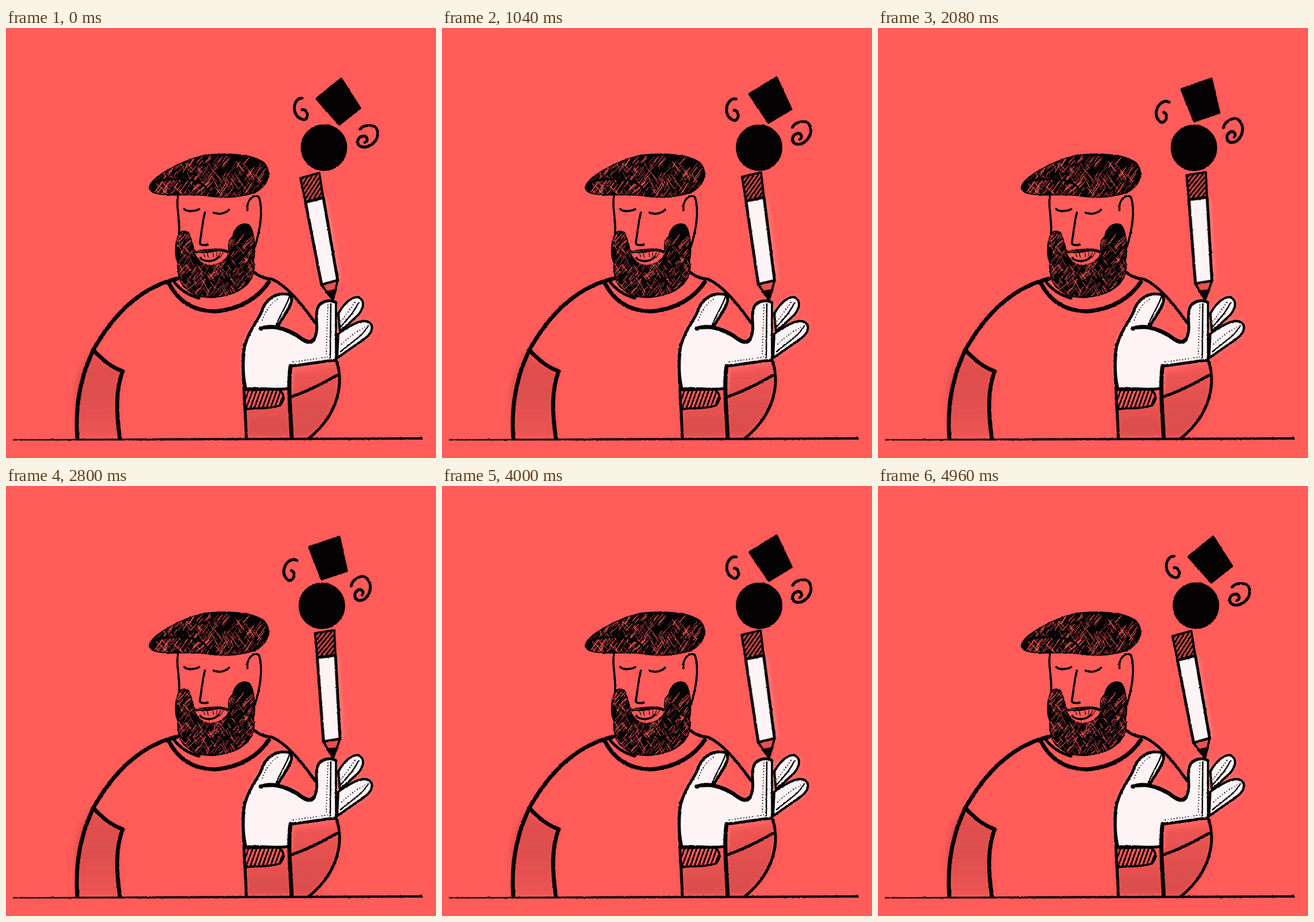
An HTML page for the animation above (5 s loop, 748x748 px).

```html
<!DOCTYPE html>
<html lang="en">
<head>
<meta charset="utf-8">
<title>Balancing act</title>
<style>
  html, body { margin: 0; width: 100%; height: 100%; overflow: hidden; background: #ff5c5a; }
  svg { display: block; width: 100vw; height: 100vh; }
  .ink { fill: none; stroke: #050203; stroke-width: 5; stroke-linecap: round; stroke-linejoin: round; }
  .thick { stroke-width: 7; }
  .thin { stroke-width: 3.6; }
  .fine { stroke-width: 2.4; }
  .solid { fill: #050203; }
  .white { fill: #fef4f6; }
  .dots { stroke-width: 2; stroke-dasharray: 0 5; }
  .scratch { fill: none; stroke: #f85a58; stroke-linecap: round; }
</style>
</head>
<body>
<svg viewBox="0 0 748 748">
  <defs>
    <filter id="rough" x="-10%" y="-10%" width="120%" height="120%" color-interpolation-filters="sRGB">
      <feTurbulence type="fractalNoise" baseFrequency=".3" numOctaves="2" seed="4"/>
      <feDisplacementMap in="SourceGraphic" scale="2.4" xChannelSelector="R" yChannelSelector="G"/>
    </filter>
    <filter id="soft" x="-30%" y="-30%" width="160%" height="160%"><feGaussianBlur stdDeviation="5"/></filter>
    <linearGradient id="sleeveShade" x2="0" y2="1">
      <stop stop-color="#b43e3e" stop-opacity=".4"/>
      <stop offset=".45" stop-color="#b43e3e" stop-opacity=".45"/>
      <stop offset="1" stop-color="#b43e3e" stop-opacity=".25"/>
    </linearGradient>
    <linearGradient id="armShade" x2="0" y2="1">
      <stop stop-color="#b43e3e" stop-opacity=".2"/>
      <stop offset=".6" stop-color="#b43e3e" stop-opacity=".45"/>
      <stop offset="1" stop-color="#b43e3e" stop-opacity=".5"/>
    </linearGradient>
    <path id="cap" d="M251 274C258 259 300 233 346 222C390 217 440 221 452 240C461 256 454 274 432 286C400 295 372 295 350 291C320 287 280 293 258 286C251 283 249 278 251 274Z"/>
    <path id="beard" d="M302 357C293 375 294 398 300 410C298 430 304 448 318 456C330 468 350 469 362 468C382 466 404 460 416 448C428 438 434 418 430 406C434 388 432 350 421 342C405 338 396 353 396 362C388 368 385 380 390 390C375 383 350 384 329 390C324 380 322 365 317 356C310 353 305 354 302 357Z"/>
    <path id="palm" d="M417 627C409 590 412 560 418 545C424 525 436 512 444 495C450 472 470 458 494 464C503 475 490 490 472 520C490 524 505 534 508 536C522 548 530 549 535 542C546 525 537 510 541 492C544 472 568 472 574 478L574 577L495 588L492 628Z"/>
    <path id="fingers" d="M578 497C586 482 600 467 613 468C626 475 622 488 612 500L581 528ZM578 532C600 516 620 505 632 512C642 522 635 532 622 542L576 574Z"/>
    <clipPath id="capClip"><use href="#cap"/></clipPath>
    <clipPath id="beardClip"><use href="#beard"/></clipPath>
    <clipPath id="bandClip"><path d="M417 630L470 629C484 631 486 645 478 655C470 662 440 661 418 663Z"/></clipPath>
    <clipPath id="eraserClip"><path d="M511 261L545 251L552 295L521 303Z"/></clipPath>
  </defs>

  <!-- soft shading -->
  <g filter="url(#soft)">
    <path fill="url(#sleeveShade)" d="M146 566L203 598C190 640 194 680 198 711H126C118 660 112 610 146 566Z"/>
    <path fill="url(#armShade)" d="M417 655L495 645V711H417Z"/>
    <path fill="url(#armShade)" d="M497 600L576 588C587 630 575 675 528 711H497Z"/>
    <g fill="#fff" opacity=".35"><use href="#palm"/><use href="#fingers"/></g>
  </g>

  <g class="ink" filter="url(#rough)">
    <path class="solid" stroke="none" d="M12 715.5L300 713.5L725 712V716L300 717.5L12 717.5Z"/>

    <!-- body -->
    <g class="thick">
      <path d="M298 436C225 453 180 510 152 560C170 580 188 592 203 597C190 630 192 670 198 713M152 560C128 610 120 660 124 713"/>
      <path d="M284 445C302 480 332 492 362 493C408 490 440 468 457 442"/>
    </g>
    <path d="M291 440C302 455 318 465 336 470M433 426C440 432 452 436 463 437C486 447 510 474 538 513"/>
    <path d="M574 577C588 615 580 670 528 713M498 641C530 630 555 616 576 604"/>

    <!-- head -->
    <g class="thin">
      <path d="M299 293C295 310 303 330 301 357M420 317C418 300 430 288 440 294C447 315 443 350 433 380"/>
      <path d="M310 315C315 320 330 319 336 315M361 321C368 325 382 323 388 316M346 321C341 340 340 360 337 374C338 378 345 378 351 377"/>
    </g>
    <use href="#beard" class="solid" stroke-width="3"/>
    <g id="beardHatch" class="scratch" clip-path="url(#beardClip)"/>
    <path fill="#f85a58" stroke="none" d="M328 390C338 385 350 391 357 388C368 384 380 387 388 391C382 404 370 412 354 412C342 411 333 402 328 390Z"/>
    <path class="fine" d="M330 391C340 388 350 392 357 389C368 386 378 387 386 391"/>
    <path class="thin" d="M338 400C346 408 362 407 370 398"/>
    <path stroke-width="1.2" d="M343 391l3 7m4 -6l2 7m8 -9l1 8m6 -8l-1 7m7 -7l-3 8m8 -7l-6 9"/>
    <use href="#cap" class="solid" stroke-width="3.6"/>
    <g id="capHatch" class="scratch" clip-path="url(#capClip)"/>
    <path class="thin" d="M258 268C290 258 335 262 346 276C353 286 358 289 366 292"/>

    <!-- glove and forearm -->
    <use href="#fingers" class="white" stroke-width="4"/>
    <use href="#palm" class="white" stroke="none"/>
    <path d="M417 627C409 590 412 560 418 545C424 525 436 512 444 495C450 472 470 458 494 464C503 475 490 490 472 520M535 542C546 525 537 510 541 492C544 472 568 472 574 478"/>
    <path class="thin" d="M574 478L574 577"/>
    <path class="thick" d="M443 523C465 515 490 525 508 536C522 547 530 549 535 542M495 588C490 620 495 670 497 713"/>
    <path d="M415 550C409 600 417 660 418 713M417 628C440 625 470 631 492 627M495 588C520 586 545 580 573 578"/>
    <path class="thin" d="M417 630L470 629C484 631 486 645 478 655C470 662 440 661 418 663"/>
    <g id="bandHatch" stroke-width="3" clip-path="url(#bandClip)"/>
    <path class="fine" d="M470 517C476 500 488 484 493 467M565 480L564 574M582 520C595 505 606 494 613 478M582 563C602 546 622 534 630 518"/>
    <path class="dots" d="M446 508C452 490 462 477 476 470M560 482L557 570M500 581C525 577 545 575 560 572M583 510C592 498 602 486 607 476M584 550C600 534 614 526 625 520"/>
  </g>

  <!-- balanced stack -->
  <g id="pencil">
    <path fill="#fff" opacity=".3" filter="url(#soft)" d="M524 303L556 295L582 439L552 447Z"/>
    <g class="ink" stroke-width="4" filter="url(#rough)">
      <path fill="#c84846" stroke="none" d="M511 261L545 251L552 295L521 303Z"/>
      <g id="eraserHatch" stroke-width="2.8" clip-path="url(#eraserClip)"/>
      <path class="white" d="M521 303L552 295L577 439L549 447Z"/>
      <path class="thin" fill="#e65250" d="M549 447L577 439L569 473Z"/>
      <path class="solid" stroke-width="2" d="M556 459L573 455L569 474Z"/>
      <path class="thin" d="M512 261L545 252L552 295L521 303Z"/>
    </g>
  </g>
  <g id="ball"><g class="ink" filter="url(#rough)"><circle class="solid" cx="553" cy="208" r="38"/></g></g>
  <g id="box"><g class="ink" filter="url(#rough)"><path class="solid" d="M541 123L583 89L615 139L580 167Z"/></g></g>
  <g id="swirlL"><g class="ink" filter="url(#rough)"><path d="M515 122C504 122 499 136 503 147C507 157 517 162 522 158C527 152 523 141 515 142"/></g></g>
  <g id="swirlR"><g class="ink" filter="url(#rough)"><path d="M616 176C620 170 631 168 640 171C649 175 648 189 642 197C635 206 623 210 615 205C608 198 613 188 623 188C630 190 630 198 624 199"/></g></g>
</svg>

<script>
const $ = id => document.getElementById(id);
let seed = 11;
const rand = (a, b) => a + (b - a) * ((seed = seed * 16807 % 2147483647) / 2147483647);

function strokes(id, lines) {
  $(id).innerHTML = lines.map(([x, y, dx, dy, w]) =>
    `<path d="M${x} ${y}l${dx} ${dy}"${w ? ` stroke-width="${w}"` : ''}/>`).join('');
}

function scratches(id, count, x0, y0, x1, y1, length) {
  strokes(id, Array.from({ length: count }, (_, i) => {
    const angle = i % 3 ? rand(-1.05, -.75) : rand(.75, 1.15);
    const len = rand(.4, 1) * length;
    return [rand(x0, x1), rand(y0, y1), len * Math.cos(angle), len * Math.sin(angle), rand(.5, 1.2)];
  }));
}

scratches('capHatch', 260, 256, 232, 440, 300, 22);
scratches('beardHatch', 300, 296, 360, 428, 472, 18);
strokes('bandHatch', Array.from({ length: 11 }, (_, i) => [410 + i * 7, 664, 13, -36]));
strokes('eraserHatch', Array.from({ length: 9 }, (_, i) => [488 + i * 7, 305, 32, -50]));

function place(id, x, y, dx, dy, angle) {
  $(id).setAttribute('transform', `translate(${dx} ${dy}) rotate(${angle} ${x} ${y})`);
}

function draw(now) {
  const p = (1 - Math.cos(now / 5000 * 2 * Math.PI)) / 2;
  place('pencil', 569, 474, 0, 0, 7 * p);
  place('ball', 553, 208, -3.7 * p, .5 * p, 0);
  place('box', 579, 129.5, -18 * p, -11 * p + 7.5 * p * p, 21 * p);
  place('swirlL', 513, 140, -18 * p, 4.5 * p * p, 30 * p);
  place('swirlR', 629, 188, -11.5 * p, -20 * p + 9.5 * p * p, -32 * p);
}

const start = performance.now();
function tick() {
  draw((performance.now() - start) % 5000);
  requestAnimationFrame(tick);
}
tick();
</script>
</body>
</html>
```
